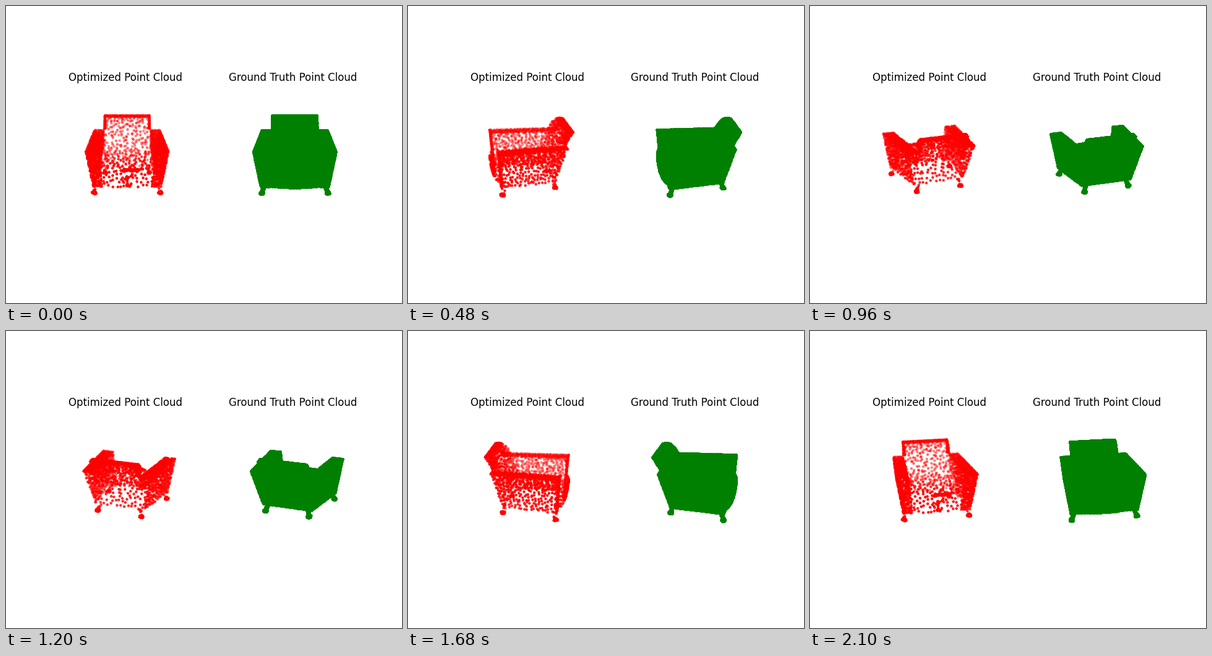
These frames come from a looping animation (640 px wide and 480 px high, 2160 ms). A matplotlib script:

```python
import numpy as np
import matplotlib.pyplot as plt
from matplotlib.animation import FuncAnimation

FRAMES, INTERVAL = 36, 60
HALF = np.array([63.3, 63.3, 47.5])
SEAT_Z, SEAT_BACK, LOW = -2, -24, -35
HEAD_FRONT, HEAD_TOP = np.array([-38, 31]), np.array([-63.3, 45.5])
HEAD_CTRL, HEAD_LOW = np.array([-49.4, 51.8]), np.array([-52, 27])
rng = np.random.default_rng(7)


def lerp(a, b, t):
    return a + (b - a) * t


def arm(u, h, w):
    """Armrest: u front to rear, h bottom to top, w inside to outside."""
    x = lerp(52 + 4 * h, -35 - 16 * h, u)
    inner = 39 + 7 * h * (1 - u)
    outer = 53 + 10.3 * h - u * (12 - 3 * h)
    return x, lerp(inner, outer, w), LOW + 59 * h


def rear(u, v):
    x, y, z = arm(1, u, 1)
    return x, y * (2 * v - 1), z


def front_x(v):
    return 56 + 7.3 * (1 - (2 * v - 1) ** 2)


def seat(u, v):
    return lerp(SEAT_BACK, front_x(v), u), 42 * (2 * v - 1), SEAT_Z


def panel(u, v):
    return front_x(v) - 6 * u ** 2, 42 * (2 * v - 1), lerp(SEAT_Z, LOW, u)


def head_curve(t):
    """Rounded profile of the headrest in the x-z plane."""
    return [lerp(lerp(a, c, t), lerp(c, b, t), t)
            for a, c, b in zip(HEAD_FRONT, HEAD_CTRL, HEAD_TOP)]


def head(u, v):
    x, z = head_curve(u)
    return x, 37 * (2 * v - 1), z


def head_side(u, v):
    x, z = head_curve(u)
    return lerp(HEAD_LOW[0], x, v), 37, lerp(HEAD_LOW[1], z, v)


def head_rear(u, v):
    x, z = lerp(HEAD_TOP, HEAD_LOW, 0.0)[:, None, None] + \
        (HEAD_LOW - HEAD_TOP)[:, None, None] * u
    return x, 37 * (2 * v - 1), z


def cushion(u, v):
    return (lerp(SEAT_BACK, HEAD_FRONT[0], u), 37.5 * (2 * v - 1),
            lerp(SEAT_Z, HEAD_FRONT[1], u))


# surface and the spacing of its points in the sparse cloud
SIDES = [
    (lambda u, v: arm(u, v, 1), 6),
    (lambda u, v: arm(u, lerp(0.56, 1, v), 0), 6.5),
    (lambda u, v: arm(0, u, v), 3.6),
    (lambda u, v: arm(u, 1, v), 3.8),
    (head_side, 4),
]
SPANS = [
    (rear, 8.5), (seat, 8.5), (panel, 8), (cushion, 8.5), (head_rear, 6.5),
    (head, 7), (lambda u, v: head(lerp(0.6, 1, u), v), 3),
]


def sample(surface, step, jitter):
    """Jittered grid of points, about one per step."""
    def point(u, v):
        u, v = np.broadcast_arrays(np.asarray(u, float), v)
        return np.stack(np.broadcast_arrays(*surface(u, v)), -1)

    p00, p10, p01, p11 = (point(np.full((1, 1), float(a)), float(b))[0, 0]
                          for b in (0, 1) for a in (0, 1))
    size = lambda a, b: np.linalg.norm(b - a)
    nu = int(np.ceil(max(size(p00, p10), size(p01, p11)) / step))
    nv = int(np.ceil(max(size(p00, p01), size(p10, p11)) / step))

    def axis(n):
        # fine grids reach the edges, coarse ones use cell centres
        return np.linspace(0, 1, n + 1) if step < 5 else (np.arange(n) + 0.5) / n

    u, v = np.meshgrid(axis(nu), axis(nv))
    u = np.clip(u + jitter * rng.uniform(-1, 1, u.shape) / nu, 0, 1)
    v = np.clip(v + jitter * rng.uniform(-1, 1, v.shape) / nv, 0, 1)
    return point(u, v).reshape(-1, 3)


def foot(x, y, n_pad, n_leg):
    def ring(n, radius):
        a = rng.uniform(0, 2 * np.pi, n)
        return radius * np.cos(a), radius * np.sin(a)

    px, py = ring(n_pad, 3.3 * np.sqrt(rng.uniform(0, 1, n_pad)))
    pad = np.c_[x + px, y + py, rng.uniform(-47.5, -44.5, n_pad)]
    t = rng.uniform(0, 1, n_leg)
    lx, ly = ring(n_leg, 1.7)
    leg = np.c_[x * (1 - 0.11 * t) + lx, y * (1 - 0.11 * t) + ly, -45 + 12 * t]
    return [pad, leg]


def seam(n):
    """Dense cross in the middle of the seat front."""
    row = panel(rng.uniform(0, 0.1, n), rng.normal(0.53, 0.1, n))
    col = panel(rng.uniform(0, 1, n // 2), rng.normal(0.51, 0.04, n // 2))
    return [np.c_[row], np.c_[col]]


def armchair(dense):
    jitter = 0.1 if dense else 0.42
    grid = lambda f, s: sample(f, 2.4 if dense else s, jitter)
    parts = [grid(f, s) * (1, k, 1) for f, s in SIDES for k in (1, -1)]
    parts += [grid(f, s) for f, s in SPANS]
    counts = (70, 80) if dense else (40, 6)
    for x, y in ((51.5, 52), (-36, 37)):
        for k in (1, -1):
            parts += foot(x, k * y, *counts)
    if not dense:
        parts += seam(44)
    return np.clip(np.vstack(parts), -HALF, HALF)


def add_cloud(pos, title, pts, color, shade):
    ax = fig.add_subplot(1, 2, pos, projection="3d")
    ax.scatter(*pts.T, c=color, s=5, depthshade=shade)
    ax.auto_scale_xyz(*[(-h, h) for h in HALF])
    ax.set_title(title)
    ax.set_axis_off()
    return ax


fig = plt.figure(figsize=(6.4, 4.8), dpi=100)
axes = [
    add_cloud(1, "Optimized Point Cloud", armchair(False), "r", True),
    add_cloud(2, "Ground Truth Point Cloud", armchair(True), "g", False),
]


def update(i):
    for ax in axes:
        ax.view_init(elev=20, azim=i * 360 / FRAMES)
    return axes


anim = FuncAnimation(fig, update, frames=FRAMES, interval=INTERVAL, repeat=True)
plt.show()
```
